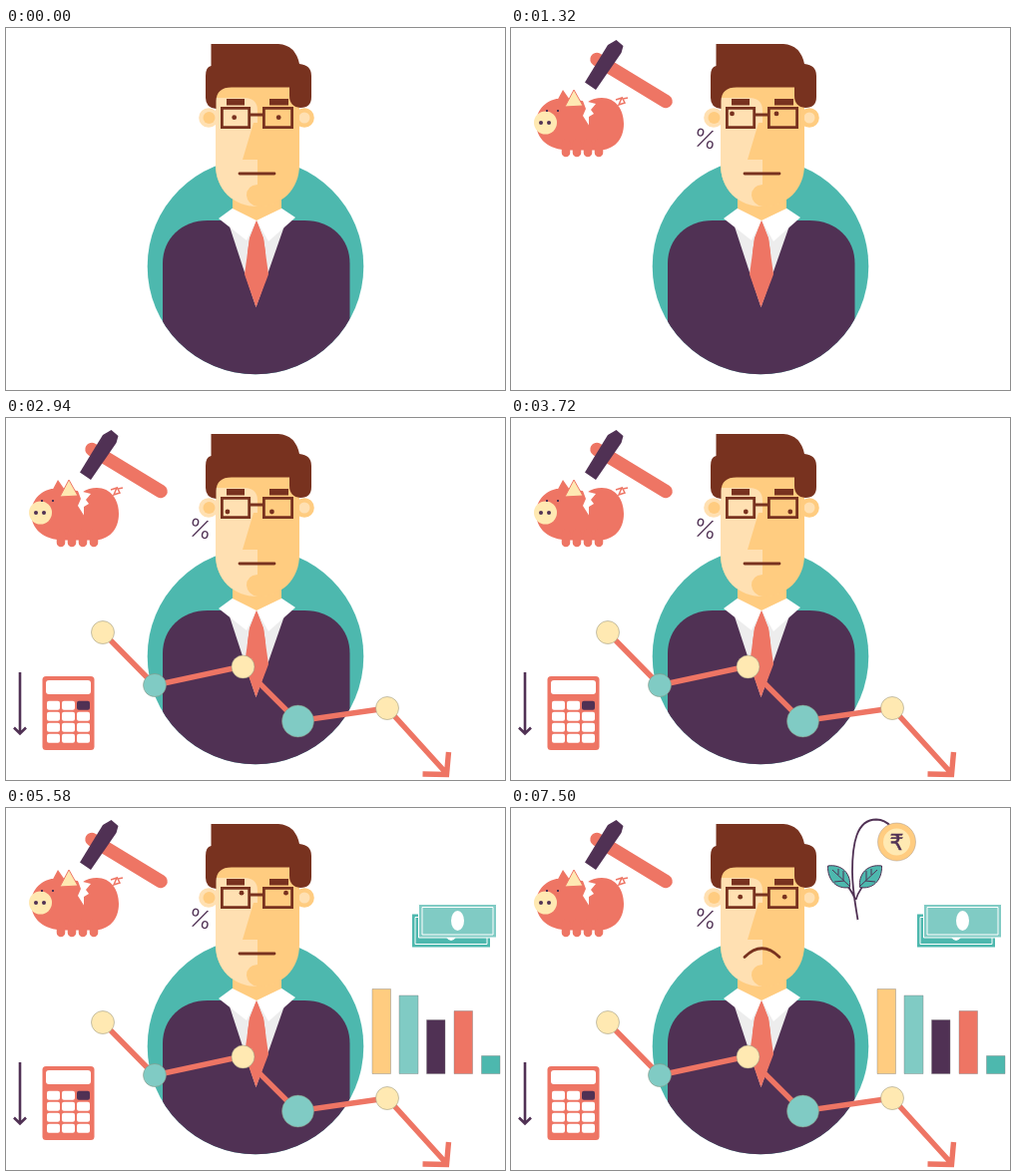
An HTML page for the animation above (8 s loop, 500x363 px).

```html
<!DOCTYPE html>
<html lang="en">
<head>
<meta charset="utf-8">
<style>
  html, body { margin: 0; width: 100%; height: 100%; overflow: hidden; background: #fff; }
  svg { display: block; width: 100vw; height: 100vh; }
  .purple { fill: #503154; } .coral { fill: #ee7564; } .teal { fill: #4db8ae; }
  .mint { fill: #80cbc4; } .cream { fill: #ffe9b2; } .skin { fill: #ffcc80; }
  .light { fill: #ffe0b2; } .brown { fill: #78321f; } .white { fill: #fff; }
  .line { fill: none; stroke: #503154; stroke-width: 1.800; }
  .coralLine { fill: none; stroke: #ee7564; stroke-width: 5.400; }
  .brownLine { fill: none; stroke: #78321f; stroke-width: 2.800; }
  .whiteLine { fill: none; stroke: #fff; stroke-width: 1; }
</style>
</head>
<body>
<svg viewBox="0 0 500 363">
  <defs><clipPath id="disc"><circle cx="250" cy="239" r="108.3"/></clipPath></defs>

  <g id="body">
    <circle class="teal" cx="250" cy="239" r="108.3"/>
    <path class="purple" clip-path="url(#disc)" d="M157 236C157 211 176 193 202 193H299C326 193 344.5 211 344.5 236V350H157Z"/>
    <path fill="#ededed" d="M223 196L250.500 280L280.500 194L251 190Z"/>
    <path class="coral" d="M251 193L244 211L239 247L250.500 280L263 247L258 211Z"/>
    <path class="white" d="M228 180L213 191L241 213L251 193L263 214L290 190L275 180Z"/>
    <path class="coral" d="M251 193L244 211L242 225H260L258 211Z"/>
    <path class="skin" d="M227 160H276V181L251 193L227 181Z"/>
  </g>

  <g id="head">
    <circle class="light" cx="203" cy="90" r="9.800"/><circle class="skin" cx="203.500" cy="90" r="6"/>
    <circle class="skin" cx="299" cy="90" r="9.800"/><circle class="light" cx="299" cy="90" r="5.500"/>
    <path class="skin" d="M210 50H294V137C294 162 276 179 252 179S210 162 210 137Z"/>
    <path class="light" d="M210 70H240Q252 71 252 83V95H248L237 132H252V157Q241 158 241 168Q242 177 252 179C228 179 210 162 210 137Z"/>
    <path class="brown" d="M205.500 16H273Q290 17 294 36Q306 37 306 48V69Q306 80 295 80Q284 79 284 68V59.500H226Q211 59.500 210.500 73V81Q200 80 200 70V48Q200 39 205.500 38Z"/>
    <path class="brown" d="M221 71H239V77.500H221ZM264 71H283V77.500H264Z"/>
    <path class="brownLine" d="M216.400 80.400H243.700V99.700H216.400ZM258.400 80.400H286.600V99.700H258.400ZM244 87H258"/>
    <circle id="leftPupil" class="brown" r="2.400"/>
    <circle id="rightPupil" class="brown" r="2.400"/>
    <path id="mouth" class="brownLine" stroke-linecap="round"/>
  </g>

  <g data-from="600">
    <path class="coral" d="M25 94C27 77 41 69 57 70.500L77 74Q83 70 91 70C105 70 113 82 113 96C113 112 103 122.500 88 122.500H57C38 122 25 112 25 94ZM45 75L52 62L61 75Z"/>
    <path class="coralLine" style="stroke-width:8.500" stroke-linecap="round" d="M55 115V125M66 115V125M77 115V125M88 115V125"/>
    <path class="white" d="M68 66L72 73L75 81L72 88L78 97.500L78 89L83 86L80 82L85 76L77 74L84 66Z"/>
    <path class="cream" stroke="#ee7564" d="M54 79L63 62L72 78Z"/>
    <circle class="cream" cx="34.500" cy="95" r="11.500"/>
    <path class="purple" d="M35 82h2v2h-2zM46 82h2v2h-2z"/>
    <circle class="purple" cx="30" cy="95" r="2"/><circle class="purple" cx="38" cy="95" r="2"/>
    <path class="coralLine" style="stroke-width:1.500" d="M105 72L111 70L108 77L114 75L112 71L117 70"/>
    <path class="coralLine" style="stroke-width:13.500" stroke-linecap="round" d="M86 31.500L155 73.500"/>
    <path class="purple" d="M74 54.500L97 17L105.500 12L112.500 18L110.500 25L85 62Z"/>
    <text class="purple" x="194.500" y="120" font-size="25" font-weight="300" text-anchor="middle" font-family="Inter, sans-serif" transform="rotate(10 194.500 111)">%</text>
  </g>

  <g data-from="2040">
    <path class="line" style="stroke-width:2.600" d="M14 255V316M8 310.500L14 316.500L20 310.500"/>
    <rect class="coral" x="36.500" y="259" width="52" height="74" rx="3.500"/>
    <rect class="white" x="40" y="263" width="45" height="14" rx="3"/>
    <g id="keys"></g>
    <path class="coralLine" d="M97 215L149 268L237 249L292 304L382 291L441 356M417.500 357L441.500 357.500L443.500 335"/>
    <g stroke="#8a8a78" stroke-width=".5">
      <circle class="cream" cx="97" cy="215" r="11.500"/><circle class="mint" cx="149" cy="268" r="11.500"/>
      <circle class="cream" cx="237.500" cy="249.500" r="11.500"/><circle class="mint" cx="292.500" cy="304" r="16"/>
      <circle class="cream" cx="382" cy="291" r="11.500"/>
    </g>
  </g>

  <g data-from="3780">
    <g stroke="#777" stroke-width=".4">
      <path class="skin" d="M367 181.500h18.500V266.500h-18.500z"/><path class="mint" d="M394 188h19V266.500h-19z"/>
      <path class="purple" d="M421.500 212.500h18.500V266.500h-18.500z"/><path class="coral" d="M449 203.500h18.500V266.500h-18.500z"/>
      <path class="teal" d="M476.500 248.500h18.500V266.500h-18.500z"/>
    </g>
    <path class="teal" d="M407 106.500h78V139.500h-78z"/>
    <path class="whiteLine" d="M410 109.500h72V136.500h-72z"/>
    <ellipse class="white" cx="446" cy="123" rx="6.500" ry="10"/>
    <path class="mint" stroke="#fff" d="M413.500 96.500h78V130h-78z"/>
    <path class="whiteLine" d="M417 99.500h71V127h-71z"/>
    <ellipse class="white" cx="452.500" cy="113" rx="6.500" ry="10"/>
  </g>

  <g data-from="5700">
    <path class="line" d="M347.500 112C345 96 342 82 342 64C342 36 346 11.500 366 11.500Q375 12 380 18M345 92Q342 82 328 68M345.500 92Q348 82 362 67"/>
    <g class="teal" stroke="#503154" stroke-width="1">
      <path id="leaf" d="M339.500 79.500C327 82 317 73 317.500 58C332 56 341 66 339.500 79.500ZM340 79L322 62M333 72V63M334 73L324 74M328 67V61"/>
      <use href="#leaf" transform="matrix(-1 0 0 1 689 0)"/>
    </g>
    <circle class="skin" cx="386.500" cy="34" r="19" stroke="#a98" stroke-width=".5"/>
    <circle class="cream" cx="386.500" cy="34" r="13.500"/>
    <text class="purple" x="386.500" y="42" font-size="22" text-anchor="middle" stroke="#503154" stroke-width=".5" font-family="'DejaVu Sans', sans-serif">₹</text>
  </g>
</svg>
<script>
const LOOP = 8000;
const byId = id => document.getElementById(id);
const groups = [...document.querySelectorAll('[data-from]')];

for (let i = 0; i < 12; i++) {
  const key = document.createElementNS('http://www.w3.org/2000/svg', 'rect');
  const attrs = { x: 41 + i % 3 * 15, y: 283.7 + Math.floor(i / 3) * 11, width: 13, height: 9, rx: 2,
                  class: i === 2 ? 'purple' : 'white' };
  for (const name in attrs) key.setAttribute(name, attrs[name]);
  byId('keys').append(key);
}

// Gaze: time, left pupil x and y
const gaze = [
  [0, 228.7, 89.7], [600, 221.5, 85.3], [1440, 221.5, 86], [1980, 221.3, 94], [3180, 222, 94],
  [3720, 235.3, 94], [4920, 236.7, 93], [5040, 236.7, 93], [5640, 236, 85], [6900, 236, 85.3],
  [7500, 229.7, 89.2], [LOOP, 229.7, 89.2]
];
const smooth = u => u * u * (3 - 2 * u);
const progress = (t, from, to) => smooth(Math.min(1, Math.max(0, (t - from) / (to - from))));
const mix = (a, b, u) => a + (b - a) * u;

function gazeAt(t) {
  const next = gaze.findIndex(k => k[0] > t);
  const [from, x0, y0] = gaze[next - 1], [to, x1, y1] = gaze[next];
  const u = progress(t, from, to);
  return [mix(x0, x1, u), mix(y0, y1, u)];
}

function draw(t) {
  for (const g of groups) g.style.display = t >= +g.dataset.from ? '' : 'none';
  const [x, y] = gazeAt(t);
  byId('leftPupil').setAttribute('transform', `translate(${x} ${y})`);
  byId('rightPupil').setAttribute('transform', `translate(${x + 44.5} ${y})`);
  const sad = progress(t, 6900, 7500);
  const end = mix(146, 149.5, sad), bend = mix(146, 132, sad);
  byId('mouth').setAttribute('d', `M234 ${end}Q251.500 ${bend} 269 ${end}`);
}

const start = performance.now();
function tick() {
  draw((performance.now() - start) % LOOP);
  requestAnimationFrame(tick);
}
tick();
</script>
</body>
</html>
```
